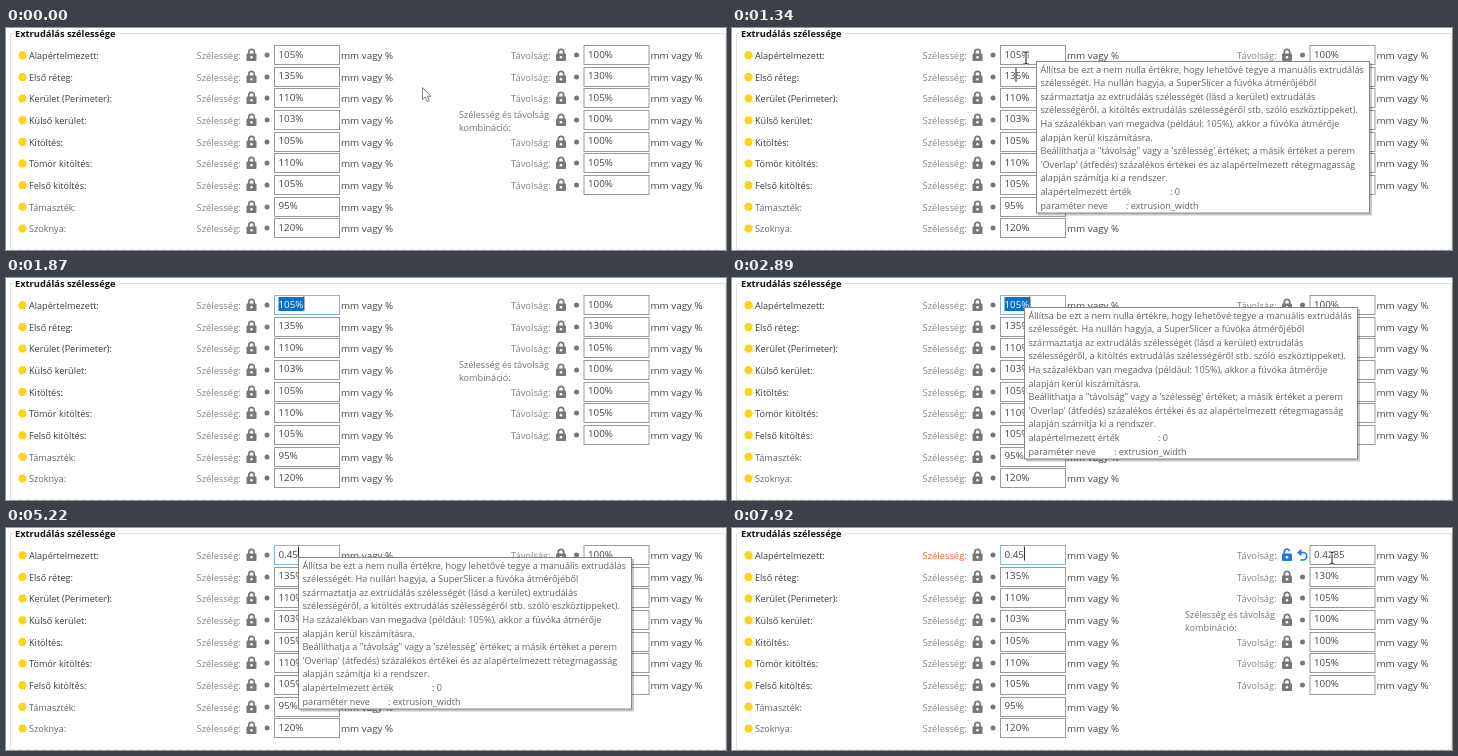
These frames come from a looping animation (720x222 px, 8 s). An HTML page:

```html
<!DOCTYPE html>
<html lang="hu">
<head>
<meta charset="utf-8">
<style>
  html, body { margin: 0; width: 100%; height: 100%; overflow: hidden; background: #fff; }
  svg { display: block; font-family: "Open Sans", "Noto Sans", sans-serif; }
  .title { font-size: 9.3px; font-weight: 700; fill: #111; }
  .name { font-size: 9.1px; fill: #3c3c3c; }
  .soft { fill: #666; }
  .label { font-size: 9.4px; fill: #858585; }
  .pair { font-size: 9.15px; fill: #6f7777; }
  .value, .unit { font-size: 9.8px; fill: #444; }
  .tip { font-size: 9.12px; fill: #626262; }
  .field { fill: #fff; stroke: #999; }
</style>
</head>
<body>
<svg id="stage" width="720" height="222" viewBox="0 0 720 222"></svg>
<script>
const LOOP = 8000;
const GRAY = "#777", BLUE = "#1f78e0", RED = "#f0603c";
const stage = document.getElementById("stage");

function add(parent, tag, attrs, content = "") {
  const node = document.createElementNS("http://www.w3.org/2000/svg", tag);
  for (const key in attrs) node.setAttribute(key, attrs[key]);
  node.textContent = content;
  parent.append(node);
  return node;
}
const text = (parent, x, y, cls, content) => add(parent, "text", { x, y, class: cls }, content);
const group = (parent, x = 0, y = 0) => add(parent, "g", { transform: `translate(${x} ${y})` });
const show = (node, on) => node.setAttribute("visibility", on ? "visible" : "hidden");
const place = (node, x, y) => node.setAttribute("transform", `translate(${x} ${y})`);

function lock(parent, x, y, color, open) {
  const icon = group(parent, x, y);
  const shackle = open ? "M-2.7 0V-3.2A2.7 2.7 0 0 1 2.6 -3.8" : "M-2.7 0V-3A2.7 2.7 0 0 1 2.7 -3V0";
  add(icon, "path", { d: shackle, fill: "none", stroke: color, "stroke-width": 1.7 });
  add(icon, "rect", { x: -5, y: -1.5, width: 10, height: 7.5, rx: 1, fill: color });
  add(icon, "circle", { cy: 2.2, r: 1.3, fill: "#fff" });
}

function setting(x, row, value) {
  const y = Math.round(row * 21.65), base = 31 + row * 21.65;
  const icons = group(stage);
  lock(icons, x - 22.5, y + 27, GRAY);
  add(icons, "circle", { cx: x - 7, cy: y + 27, r: 2.5, fill: GRAY });
  const field = add(stage, "rect", { x: x + .5, y: y + 17.5, width: 65, height: 19, class: "field" });
  const entry = text(stage, x + 4.5, base - 1.5, "value", value);
  text(stage, x + 67, base, "unit", "mm vagy %");
  return { icons, field, entry };
}

// Group frame
add(stage, "path", { d: "M8 5.5H4.5V221M112 5.5H719.5V221", fill: "none", stroke: "#e2e2e2" });
add(stage, "path", { d: "M4 221.5H720", stroke: "#e6e6e6", "stroke-dasharray": "5 3" });
text(stage, 9, 9, "title", "Extrudálás szélessége");

const rows = [
  ["Alapértelmezett:", "105%", "100%"], ["Első réteg:", "135%", "130%"],
  ["Kerület (Perimeter):", "110%", "105%"], ["Külső kerület:", "103%", "100%"],
  ["Kitöltés:", "105%", "100%"], ["Tömör kitöltés:", "110%", "105%"],
  ["Felső kitöltés:", "105%", "100%"], ["Támaszték:", "95%"], ["Szoknya:", "120%"]
].map(([name, width, spacing], i) => {
  const base = 31 + i * 21.65;
  add(stage, "path", { d: "M-2 -4H2L4 -1.5V1.5L2 4H-2L-4 1.5V-1.5Z", fill: "#ffd21c",
    transform: `translate(16.5 ${base - 3.7})` });
  text(stage, 23, base, i > 6 ? "name soft" : "name", name);
  const label = text(stage, 190.5, base, "label", "Szélesség:");
  const left = setting(268, i, width);
  const right = spacing && setting(577.5, i, spacing);
  if (spacing && i !== 3) text(stage, 505, base, "label", "Távolság:");
  return { label, left, right };
});
text(stage, 453, 89.5, "pair", "Szélesség és távolság");
text(stage, 453, 102.5, "pair", "kombináció:");

// Icons of an edited spacing value
const edited = group(stage);
lock(edited, 555, 27, BLUE, true);
add(edited, "path", { d: "M566.5 24.5H571A3.7 3.7 0 0 1 571 32H568.5", fill: "none", stroke: BLUE, "stroke-width": 1.7 });
add(edited, "path", { d: "M565 24.5L569.5 20.8V28.2Z", fill: BLUE });

const first = rows[0], widthEntry = first.left.entry;
const selection = add(stage, "rect", { x: 272.5, y: 19, height: 14, fill: "#0b6fcb" });
stage.insertBefore(selection, widthEntry);
const caret = add(stage, "rect", { width: 1, height: 14, fill: "#222" });

// Tooltip
const tip = group(stage);
add(tip, "rect", { x: 2, y: 2, width: 334, height: 152.5, fill: "#000", opacity: .22 });
add(tip, "rect", { x: .5, y: .5, width: 333, height: 151.5, fill: "#fff", stroke: "#858585" });
[
  "Állítsa be ezt a nem nulla értékre, hogy lehetővé tegye a manuális extrudálás",
  "szélességét. Ha nullán hagyja, a SuperSlicer a fúvóka átmérőjéből",
  "származtatja az extrudálás szélességét (lásd a kerület) extrudálás",
  "szélességéről, a kitöltés extrudálás szélességéről stb. szóló eszköztippeket).",
  "Ha százalékban van megadva (például: 105%), akkor a fúvóka átmérője",
  "alapján kerül kiszámításra.",
  "Beállíthatja a \"távolság\" vagy a 'szélesség' értéket; a másik értéket a perem",
  "'Overlap' (átfedés) százalékos értékei és az alapértelmezett rétegmagasság",
  "alapján számítja ki a rendszer.",
  "alapértelmezett érték", "paraméter neve"
].forEach((line, i) => text(tip, 4.5, 11.5 + i * 13.6, "tip", line));
text(tip, 134, 133.9, "tip", ": 0");
text(tip, 90, 147.5, "tip", ": extrusion_width");

// Pointers
const halo = add(stage, "circle", { cx: 294, cy: 30, r: 7, fill: "#ffd800", opacity: .6 });
const arrow = add(stage, "path", { d: "M.5 .5V12.5L3.3 10L5.2 14.5L7.2 13.6L5.3 9.3H9Z", fill: "#fff", stroke: "#777", "stroke-width": .9 });
const beam = group(stage);
const beamShape = "M-3 -6H-1L0 -5L1 -6H3M0 -5V5M-3 6H-1L0 5L1 6H3";
add(beam, "path", { d: beamShape, fill: "none", stroke: "#fff", "stroke-width": 2.6 });
add(beam, "path", { d: beamShape, fill: "none", stroke: "#333", "stroke-width": 1.1 });

// [time, shape, x, y]
const pointerSteps = [
  [0, arrow, 416, 59], [390, arrow, 408, 58], [460, arrow, 378, 54], [530, arrow, 340, 50],
  [600, beam, 306, 48], [670, beam, 288, 47], [800, beam, 286, 44], [870, beam, 292, 36],
  [940, beam, 297, 30], [1200, beam, 294, 30], [1870, null], [6890, beam, 312, 24],
  [6960, beam, 324, 23], [7030, arrow, 430, 15], [7170, arrow, 440, 16], [7390, arrow, 480, 17],
  [7450, arrow, 545, 17], [7510, arrow, 584, 17], [7660, beam, 590, 19], [7720, beam, 595, 25],
  [7790, beam, 598, 28], [7920, beam, 600, 30]
];
const typed = [[0, "105%"], [3300, "0"], [3370, "0."], [4620, "0.4"], [5220, "0.45"]];
const caretOn = [[1340, 1610], [1870, 2340], [2890, 3890], [4420, 5160], [5220, 6430], [6960, LOOP]];
const latest = (steps, t) => steps.findLast(step => step[0] <= t);

function tipOpacity(t) {
  const step = Math.floor((t - 870) / 67) * 67 + 870;
  if (t < 870 || t >= 7030) return 0;
  if (t < 1140) return (step - 803) / 337;
  if (t < 1610) return 1;
  if (t < 1870) return .65 - Math.floor((t - 1610) / 60) * .15;
  return t < 2140 ? 0 : 1;
}

function draw(t) {
  const selected = t >= 1610 && t < 3300;
  widthEntry.textContent = latest(typed, t)[1];
  const textWidth = widthEntry.getComputedTextLength();
  widthEntry.style.fill = selected ? "#fff" : "";
  selection.setAttribute("width", textWidth);
  show(selection, selected);
  first.left.field.style.stroke = t >= 1610 ? "#83b4e2" : "";

  show(caret, caretOn.some(([from, to]) => t >= from && t < to));
  if (t < 1610) place(caret, 283.5, 40);
  else place(caret, 272.5 + textWidth, 18.5);

  first.label.style.fill = t >= 5900 ? RED : "";
  const changed = t >= 6030;
  first.right.entry.textContent = changed ? "0.4285" : "100%";
  show(first.right.icons, !changed);
  show(edited, changed);

  tip.setAttribute("opacity", tipOpacity(t));
  place(tip, ...(t < 1870 ? [304, 33] : [292, 29]));

  const [, shape, x, y] = latest(pointerSteps, t);
  for (const pointer of [arrow, beam]) show(pointer, pointer === shape);
  if (shape) place(shape, x, y);
  show(halo, t >= 1610 && t < 1870);
}

const start = performance.now();
function tick() {
  draw((performance.now() - start) % LOOP);
  requestAnimationFrame(tick);
}
tick();
</script>
</body>
</html>
```
